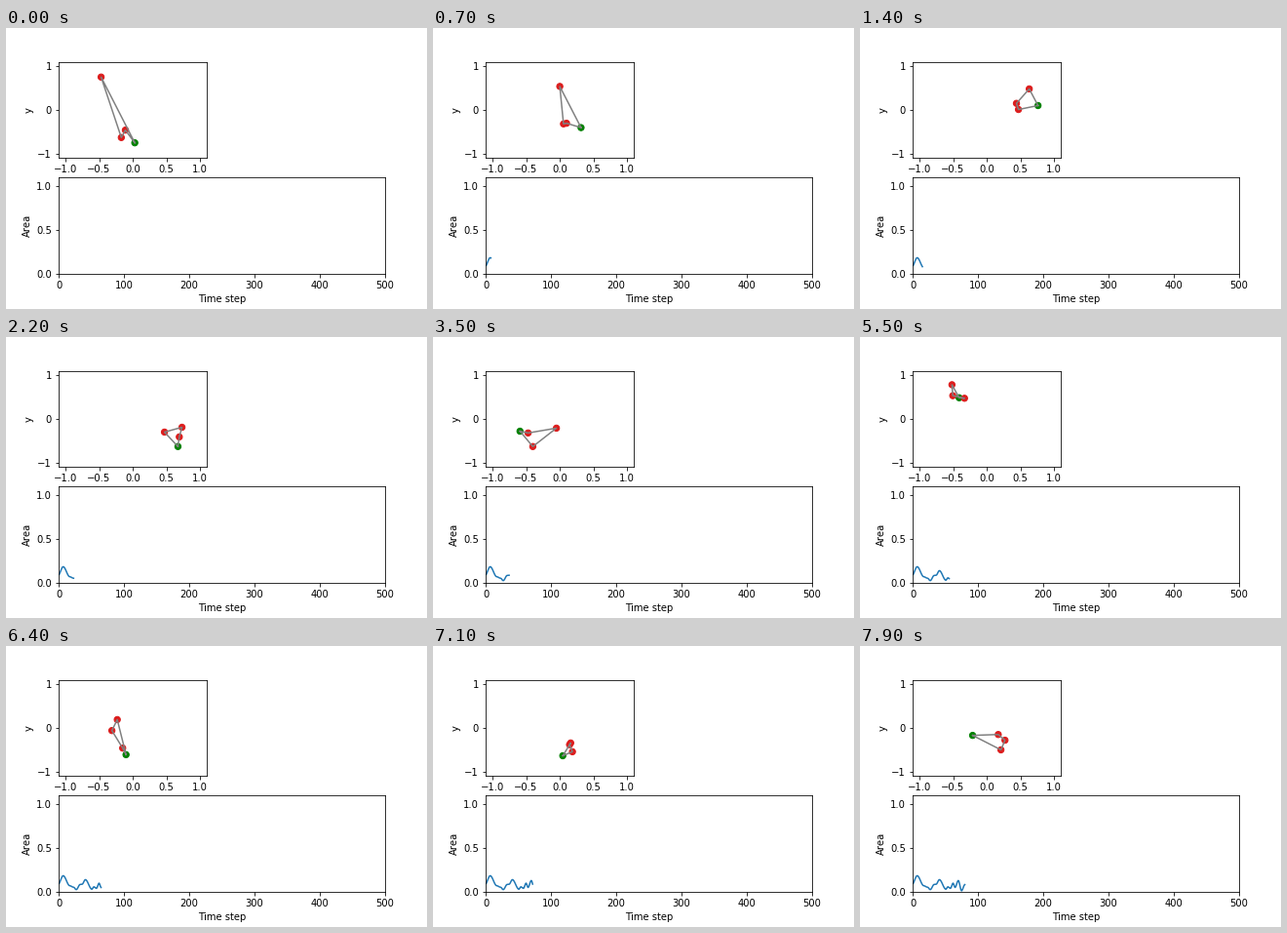
A matplotlib script that plays this animation: 432 by 288 pixels, repeating every 8 s.

```python
import numpy as np
import matplotlib.pyplot as plt
from matplotlib.animation import FuncAnimation

FRAMES, INTERVAL = 80, 100
SPEED = .09

# Kerning factor 6 keeps label letters on whole pixels.
plt.rcParams.update({"font.family": "DejaVu Sans", "font.size": 10,
                     "text.kerning_factor": 6})

# Key poses by step: the leader, then its followers counter-clockwise.
POSES = {
    0: [(.03, -.75), (-.47, .75), (-.17, -.63), (-.11, -.46)],
    14: [(.76, .10), (.63, .48), (.44, .15), (.47, .01)],
    22: [(.67, -.63), (.69, -.41), (.73, -.19), (.47, -.30)],
    35: [(-.59, -.28), (-.40, -.63), (-.05, -.21), (-.47, -.32)],
    45: [(-.57, .86), (-.65, .57), (-.53, .32), (-.34, .66)],
    64: [(-.10, -.61), (-.23, .19), (-.31, -.06), (-.15, -.46)],
    79: [(-.21, -.17), (.21, -.50), (.27, -.28), (.17, -.15)],
}

# Turning points of the area, eased in between.
AREA = {-2: .08, 6: .185, 16: .07, 22: .053, 26: .025, 32: .085, 35: .087,
        40: .14, 50: .03, 53: .058, 57: .04, 61: .10, 64: .05, 69: .13,
        74: .012, 79: .083}


def heading(pose):
    """The whole flock moves from the followers towards the leader."""
    ahead = pose[0] - pose[1:].mean(axis=0)
    return SPEED * ahead / np.hypot(*ahead)


def glide(t, points, slope=lambda value: 0):
    """Cubic Hermite motion through the points, with a slope rule at each."""
    keys = list(points)
    i = min(np.searchsorted(keys, t, side="right"), len(keys) - 1)
    start, end = keys[i - 1], keys[i]
    a, b = np.array(points[start]), np.array(points[end])
    span = end - start
    u = (t - start) / span
    push = slope(a) * u * (1 - u) ** 2 - slope(b) * u * u * (1 - u)
    return a + (b - a) * u * u * (3 - 2 * u) + span * push


steps = np.arange(FRAMES)
area = np.array([glide(t, AREA) for t in steps])

fig = plt.figure(figsize=(6, 4), dpi=72, facecolor="white")
fig.subplots_adjust(left=.125, right=.9, bottom=.125, top=.88,
                    wspace=.2, hspace=.2)

field = fig.add_subplot(2, 2, 1)
field.set(xlim=(-1.1, 1.1), ylim=(-1.1, 1.1), ylabel="y",
          xticks=[-1, -.5, 0, .5, 1], yticks=[-1, 0, 1])

chart = fig.add_subplot(2, 1, 2)
chart.set(xlim=(0, 500), ylim=(0, 1.1), xlabel="Time step", ylabel="Area",
          xticks=range(0, 501, 100), yticks=[0, .5, 1])

dots = field.scatter(*np.transpose(POSES[0]), s=40, zorder=1,
                     c=["green"] + ["#dc1c1c"] * 3)
outline, = field.plot([], [], color="gray", lw=1.5)
curve, = chart.plot([], [], color="C0", lw=1.5)


def update(step):
    flock = glide(step, POSES, heading)
    dots.set_offsets(flock)
    outline.set_data(*np.vstack([flock, flock[:1]]).T)
    curve.set_data(steps[:step + 1] + 1, area[:step + 1])
    return dots, outline, curve


anim = FuncAnimation(fig, update, frames=FRAMES, interval=INTERVAL,
                     repeat=True, repeat_delay=0)
plt.show()
```
